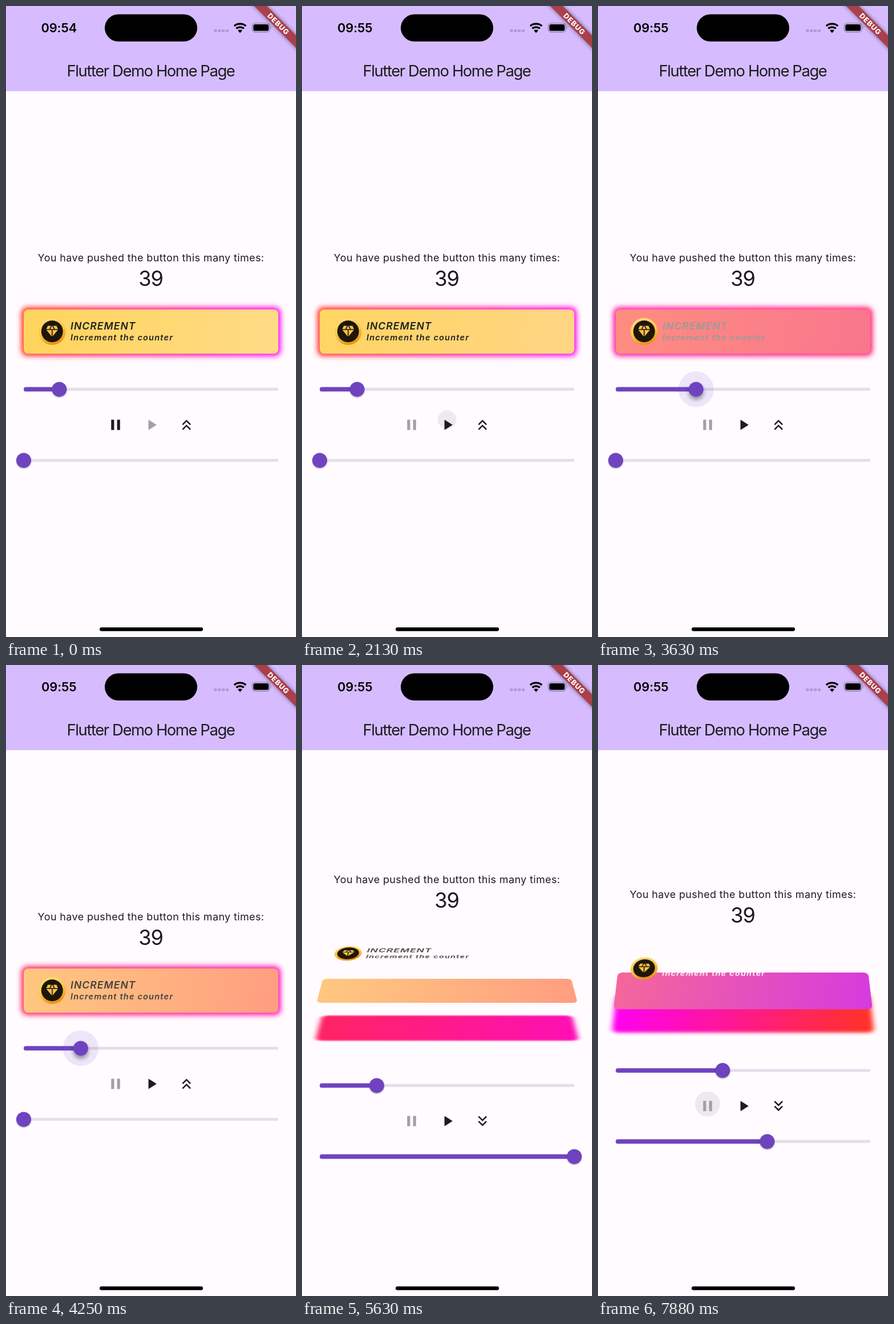
An HTML page that plays this animation: 508x1102 px, repeating every 8 s.

```html
<!DOCTYPE html>
<html lang="en">
<head>
<meta charset="utf-8">
<title>Layered button demo</title>
<style>
  html, body { margin: 0; width: 100%; height: 100%; overflow: hidden; background: #fffbff; }
  #stage { position: relative; width: 508px; height: 1102px; overflow: hidden; }
  #stage > svg { position: absolute; left: 0; top: 0; width: 508px; height: 1102px; }
  .layer { transform-origin: 254px 568.5px; }
  text { font-family: Inter, "Open Sans", sans-serif; font-optical-sizing: none; fill: #1c1b1f; }
  .mid { text-anchor: middle; }
  #caption text { font-weight: 600; font-style: italic; fill: inherit; }
</style>
</head>
<body>
<div id="stage">
  <svg viewBox="0 0 508 1102">
    <defs>
      <filter id="soft1" x="-50%" y="-50%" width="200%" height="200%"><feGaussianBlur stdDeviation="1.3"/></filter>
      <filter id="soft4" x="-50%" y="-50%" width="200%" height="200%"><feGaussianBlur stdDeviation="3.5"/></filter>
      <clipPath id="wedge"><path d="M410 47.2L390 23.4H430Z"/></clipPath>
    </defs>
    <rect width="508" height="1102" fill="#fffbff"/>
    <rect width="508" height="148.7" fill="#d6bcff"/>

    <text id="clock" x="92.8" y="45.8" class="mid" font-size="21.8" font-weight="600" letter-spacing="-.1" style="fill:#000"></text>
    <rect x="173" y="14.5" width="162" height="47.5" rx="23.75"/>
    <g fill="#ad97d0">
      <rect x="364.5" y="41" width="5" height="4.6" rx="1.4"/>
      <rect x="371.4" y="41" width="5" height="4.6" rx="1.4"/>
      <rect x="378.2" y="41" width="5" height="4.6" rx="1.4"/>
      <rect x="385" y="41" width="5" height="4.6" rx="1.4"/>
    </g>
    <g clip-path="url(#wedge)" fill="none" stroke="#000" stroke-width="3.3">
      <circle cx="410" cy="47.2" r="16"/>
      <circle cx="410" cy="47.2" r="10.3"/>
      <circle cx="410" cy="47.2" r="3" stroke-width="6"/>
    </g>
    <rect x="431.2" y="30" width="31" height="15.6" rx="5" fill="none" stroke="#8878a6" stroke-width="1.2"/>
    <rect x="433.2" y="32" width="27" height="11.6" rx="3.4"/>
    <path d="M463.8 35.4q2 2.4 0 4.8z" fill="#8878a6"/>

    <text x="253.5" y="122.8" class="mid" font-size="27.4" letter-spacing="-1.4">Flutter Demo Home Page</text>

    <g transform="translate(508 0) rotate(45)">
      <rect x="-60" y="36.2" width="120" height="15.5" fill="#000" opacity=".5" filter="url(#soft4)"/>
      <rect x="-60" y="36.2" width="120" height="15.5" fill="#ab404c"/>
      <text x=".5" y="48.5" class="mid" font-size="12.4" font-weight="800" letter-spacing="1" style="fill:#fff">DEBUG</text>
    </g>

    <g id="message">
      <text x="254" y="446" class="mid" font-size="17.9" letter-spacing=".41">You have pushed the button this many times:</text>
      <text x="253.5" y="489" class="mid" font-size="36.2" letter-spacing="-1.2">39</text>
    </g>

    <g id="controls">
      <g id="seek" transform="translate(0 669.4)"></g>
      <circle id="ripple" fill="#1c1b1f"/>
      <g fill="#1c1b1f">
        <path id="pause" transform="translate(176.5 716) scale(1.293)" d="M6 19h4V5H6zM14 5v14h4V5z"/>
        <path id="play" transform="translate(239.2 716) scale(1.293)" d="M8 5v14l11-7z"/>
        <path id="expand" d="M-6 5.6L-4.6 7 0 2.4 4.6 7 6 5.6 0-.4zM-6-1L-4.6.4 0-4.2 4.6.4 6-1 0-7z"/>
      </g>
      <g id="depth" transform="translate(0 793.5)"></g>
    </g>
    <rect x="164" y="1085.3" width="181" height="6.4" rx="3.2"/>
  </svg>

  <svg class="layer" id="glow" viewBox="0 0 508 1102">
    <defs>
      <linearGradient id="glowFill" gradientUnits="userSpaceOnUse" x1="31" y1="530" x2="477" y2="607"><stop/><stop offset="1"/></linearGradient>
      <filter id="haze" filterUnits="userSpaceOnUse" x="0" y="500" width="508" height="140" color-interpolation-filters="sRGB"><feGaussianBlur id="hazeBlur"/></filter>
    </defs>
    <rect id="halo" rx="10" fill="url(#glowFill)" filter="url(#haze)"/>
  </svg>

  <svg class="layer" id="card" viewBox="0 0 508 1102">
    <defs>
      <linearGradient id="cardFill" gradientUnits="userSpaceOnUse" x1="31" y1="530" x2="477" y2="607"><stop/><stop offset="1"/></linearGradient>
    </defs>
    <rect x="31" y="530" width="446" height="77.3" rx="8" fill="url(#cardFill)"/>
  </svg>

  <svg class="layer" id="content" viewBox="0 0 508 1102">
    <defs>
      <linearGradient id="gold" x1=".25" y1="0" x2=".6" y2="1">
        <stop stop-color="#ffdc78"/><stop offset=".55" stop-color="#fdc246"/><stop offset=".95" stop-color="#ec940f"/>
      </linearGradient>
    </defs>
    <circle cx="80.8" cy="568.4" r="23.7" fill="url(#gold)"/>
    <circle cx="80.8" cy="568.2" r="19" fill="#1d1609"/>
    <path transform="translate(67.9 555.3) scale(1.077)" fill="#f9bf4c"
      d="M12.16 3h-.32L9.21 8.25h5.58zM16.46 8.25h5.16L19 3h-5.16zM21.38 9.75h-8.63V20.1zM11.25 20.1V9.75H2.62zM7.54 8.25L10.16 3H5L2.38 8.25z"/>
    <g id="caption">
      <text x="113" y="565.3" font-size="17.6" letter-spacing="1.02">INCREMENT</text>
      <text x="113" y="584.3" font-size="14.5" letter-spacing="1.2">Increment the counter</text>
    </g>
  </svg>
</div>

<script>
const $ = id => document.getElementById(id);
const LOOP = 8000, LEFT = 31, WIDTH = 446, SPREAD = 65;
const clamp = x => Math.min(1, Math.max(0, x));
const mix = (a, b, p) => a + (b - a) * p;
const ease = p => p * p * (3 - 2 * p);
const ramp = (t, from, to) => clamp((t - from) / (to - from));
const set = (el, attrs) => { for (const k in attrs) el.setAttribute(k, attrs[k]); };

function mixColor(a, b, p) {
  const part = s => Math.round(mix(a >> s & 255, b >> s & 255, p));
  return `rgb(${part(16)},${part(8)},${part(0)})`;
}

// Picks the segment holding x and blends its two ends.
function along(keys, x, blend) {
  let i = 1;
  while (i < keys.length - 1 && keys[i][0] < x) i++;
  const [x0, a] = keys[i - 1], [x1, b] = keys[i];
  return blend(a, b, ramp(x, x0, x1));
}

// Gradient position: bounces at zero, pauses, is dragged, then plays again.
const seekKeys = [[0, .14], [700, 0], [1130, .083], [1460, .147], [2140, .147], [2620, .249],
  [3100, .249], [3550, .33], [4150, .224], [6800, .224], [7760, .42], [LOOP, .42]];
const cardKeys = [[0, 0xffbe08], [.05, 0xffc014], [.083, 0xffc430], [.143, 0xffd55f], [.2, 0xffdb86],
  [.224, 0xffc880], [.284, 0xff9d80], [.33, 0xff8680], [.42, 0xf4679a], [.48, 0xd63bde]];
const taps = [[1340, 192], [2030, 254.2], [2470, 192], [4740, 316], [6690, 254.2], [7690, 192]];
const playing = t => t < 1460 || (t >= 2140 && t < 2620) || (t >= 6800 && t < 7760);

function depthAt(t) {
  if (t < 6000) return ease(ramp(t, 4880, 5600));
  return mix(1, .595, ease(ramp(t, 6080, 6560)));
}

const held = (t, from, to) => ramp(t, from, from + 100) * (1 - ramp(t, to, to + 110));

function makeSlider(root) {
  root.innerHTML = `<rect x="${LEFT}" y="-2.6" width="${WIDTH}" height="5.2" rx="2.6" fill="#e5dfea"/>
    <rect x="${LEFT}" y="-3.9" height="7.8" rx="3.9" fill="#6f43c0"/>
    <circle fill="#6f43c0"/><circle fill="#000"/><circle r="13" fill="#6f43c0"/>`;
  const [, active, halo, shadow, thumb] = root.children;
  return (value, press) => {
    const x = LEFT + WIDTH * value;
    set(active, { width: x - LEFT });
    set(halo, { cx: x, r: 31 * Math.sqrt(press), opacity: .12 * press });
    set(shadow, {
      cx: x, cy: mix(1.4, 5, press), r: 13, opacity: mix(.3, .38, press),
      filter: press > .3 ? 'url(#soft4)' : 'url(#soft1)'
    });
    set(thumb, { cx: x });
  };
}

function drawRipple(t) {
  const tap = taps.find(([start]) => t >= start && t < start + 420);
  if (!tap) return set($('ripple'), { opacity: 0 });
  const age = t - tap[0], grow = ramp(age, 0, 250);
  set($('ripple'), {
    cx: tap[1], cy: 731.5 - 15 * (1 - grow),
    r: mix(10, 25.7, grow), opacity: .08 * ramp(age, 0, 75) * (1 - ramp(age, 290, 420))
  });
}

function drawGlow(d) {
  const grow = mix(4, 2, d);
  set($('halo'), {
    x: LEFT - grow, y: 530 - grow,
    width: WIDTH + 2 * grow, height: 77.3 + 2 * grow
  });
  set($('hazeBlur'), { stdDeviation: `5 ${5 - 3 * d}` });
}

function paintStops(id, a, b) {
  const [first, last] = $(id).children;
  set(first, { 'stop-color': a });
  set(last, { 'stop-color': b });
}

const drawSeek = makeSlider($('seek'));
const drawDepth = makeSlider($('depth'));

function draw(t) {
  const v = along(seekKeys, t, mix);
  const d = depthAt(t);
  const shift = SPREAD * d;

  $('clock').textContent = t < 1880 ? '09:54' : '09:55';
  set($('message'), { transform: `translate(0 ${-shift})` });
  set($('controls'), { transform: `translate(0 ${shift})` });
  drawSeek(v, held(t, 3000, 4400));
  drawDepth(d, held(t, 6000, 6640));
  drawRipple(t);
  drawGlow(d);

  const on = playing(t);
  set($('pause'), { fill: on ? '#1c1b1f' : '#a2a0a3' });
  set($('play'), { fill: on ? '#a2a0a3' : '#1c1b1f' });
  set($('expand'), { transform: `translate(316.2 731.5) scale(1.293 ${t < 4880 ? 1.293 : -1.293})` });

  const swap = ramp(v, .14, .42);
  paintStops('glowFill', mixColor(0xff3324, 0xff00f4, swap), mixColor(0xff00f4, 0xff3324, swap));
  paintStops('cardFill', along(cardKeys, v, mixColor), along(cardKeys, v + .06, mixColor));
  set($('caption'), { fill: mixColor(0x222020, 0xffffff, ramp(v, .19, .42)) });

  const tilt = y => `translateY(${y}px) perspective(1299px) rotateX(${d}rad)`;
  $('glow').style.transform = tilt(shift);
  $('card').style.transform = tilt(0);
  $('content').style.transform = tilt(-shift);
}

const start = performance.now();
function tick() {
  draw((performance.now() - start) % LOOP);
  requestAnimationFrame(tick);
}
tick();
</script>
</body>
</html>
```
